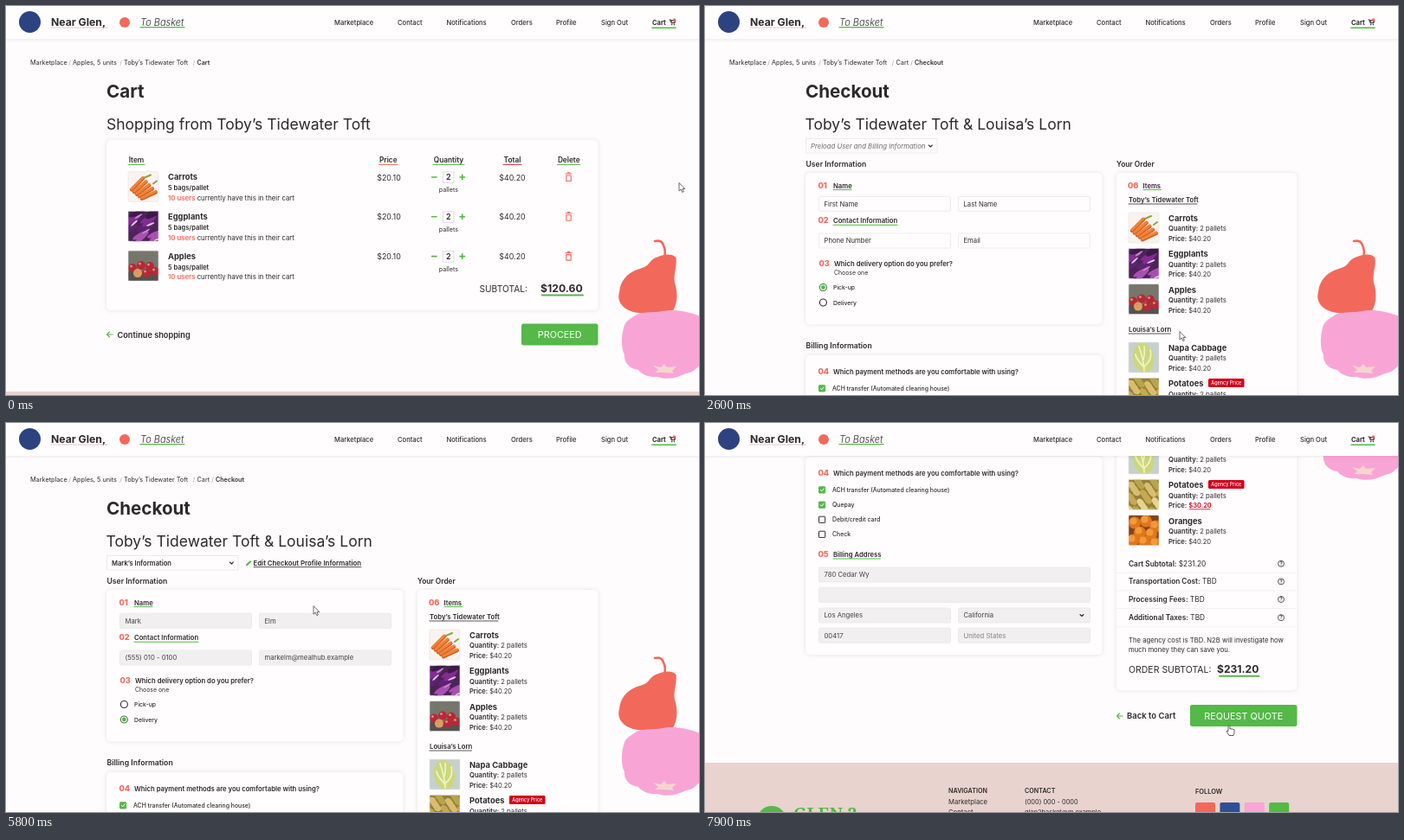
An HTML page for the animation above (8 s loop, 800x450 px).

```html
<!DOCTYPE html>
<html lang="en">
<head>
<meta charset="utf-8">
<title>Checkout walkthrough</title>
<style>
  html, body { margin: 0; width: 100%; height: 100%; overflow: hidden; background: #fefcfd; }
  svg { display: block; }
  #stage { width: 100vw; height: 100vh; }
  text { font-family: Inter, "Open Sans", sans-serif; font-optical-sizing: none; fill: #2d2a2b; white-space: pre; }
  .mid { text-anchor: middle; }
  .it { font-style: italic; }
  .serif { font-family: "Noto Serif", serif; }
  .card { fill: #fffdfe; filter: drop-shadow(0 0 2.5px #0000001c); }
  .line { fill: none; stroke-linecap: round; stroke-linejoin: round; }
</style>
</head>
<body>
<svg id="stage" viewBox="0 0 800 450"></svg>
<script>
const GREEN = '#55b848', CORAL = '#f2695c', INK = '#2d2a2b', PINK = '#f8a5d6', RED = '#d0021b', GREY = '#6d696b';
const BORDER = '#e9e6e8';
const FARM_A = 'Toby’s Tidewater Toft', FARM_B = 'Louisa’s Lorn';
const LOOP = 8000, STEP = 100, CHECKOUT = 2000, OPEN = 3900, PICK = 5200;

const text = (x, y, s, size, weight = 400, attrs = '') =>
  `<text x="${x}" y="${y}" font-size="${size}" font-weight="${weight}" ${attrs}>${s}</text>`;
const rect = (x, y, w, h, fill, attrs = '') =>
  `<rect x="${x}" y="${y}" width="${w}" height="${h}" fill="${fill}" ${attrs}/>`;
const circle = (x, y, r, fill, attrs = '') => `<circle cx="${x}" cy="${y}" r="${r}" fill="${fill}" ${attrs}/>`;
const path = (d, color, width = 1) => `<path class="line" d="${d}" stroke="${color}" stroke-width="${width}"/>`;
const card = (x, y, w, h) => `<rect class="card" x="${x}" y="${y}" width="${w}" height="${h}" rx="5"/>`;
const group = (id, body) => `<g id="${id}">${body}</g>`;
const fill = c => `fill="${c}"`;
const bold = s => `<tspan font-weight="600">${s}</tspan>`;
const rule = (x1, x2, y, color = GREEN, width = 1) => path(`M${x1} ${y}H${x2}`, color, width);
const chevron = (x, y) => path(`M${x - 2} ${y - 1}l2 2 2-2`, INK, 1.1);
const back = (x, y) => path(`M${x + 7} ${y}h-6.5m3-3l-3 3 3 3`, GREEN, 1.1);
const button = (x, y, w, s) => rect(x, y, w, 25, GREEN, 'rx="2.5"') +
  text(x + w / 2, y + 16.7, s, 10.8, 400, 'class="mid" style="fill:#fff"');

// Small produce pictures built from repeated blobs on a 35 px tile
const blobs = (n, rx, ry, turn, colors, seed) => {
  let out = '';
  for (let i = 0; i < n; i++) {
    const x = (i * 13.7 + seed) % 36, y = (i * 9.3 + seed * 2) % 36;
    out += `<ellipse rx="${rx}" ry="${ry}" fill="${colors[i % colors.length]}" transform="translate(${x} ${y}) rotate(${turn + i * 11 % 25})"/>`;
  }
  return out;
};
const sticks = (color, width, dy) => [0, 1, 2, 3, 4].map(i =>
  path(`M${4 + i * 3} ${20 + dy + i * 2.6}L${17 + i * 3.7} ${7 + dy + i * 4}`, color, width)).join('');
const produce = {
  carrots: () => rect(0, 0, 35, 35, '#f8f3ee') + path('M19 7l7-3M29 14l4-3', '#87a64b', 2) +
    sticks('#cf5d24', 4.2, 1) + sticks('#f28236', 3, 0),
  eggplants: () => rect(0, 0, 35, 35, '#4d2358') + blobs(16, 10, 2.8, -45, ['#832c92', '#5e2274', '#a94fb3', '#3c1b47'], 4) +
    blobs(5, 5, 1, -42, ['#ded0df', '#c58acb'], 7),
  apples: () => rect(0, 0, 35, 35, '#777570') + rect(0, 24, 35, 11, '#56524e') +
    [[5, 20], [15, 17], [25, 18], [31, 24], [11, 26], [21, 26]].map(([x, y], i) =>
      circle(x, y, 5, i == 4 ? '#d9a05d' : '#b52936') + circle(x - 1.5, y - 2, 1.5, '#e28a70')).join('') +
    path('M7 10l4-4M20 11l3-5', '#68824a', 2),
  cabbage: () => rect(0, 0, 35, 35, '#c6d1cd') +
    '<ellipse cx="17" cy="18" rx="12" ry="17" fill="#cbd77c" transform="rotate(-12 17 18)"/>' +
    path('M18 33Q17 18 12 5M18 29Q9 20 8 14M18 28Q28 20 25 9M17 20Q19 12 18 5', '#eef1c4', 1.8),
  potatoes: () => rect(0, 0, 35, 35, '#93803c') + blobs(40, 4, 3.3, 15, ['#d9bd6d', '#c9a851', '#e6d38c', '#b5a54c'], 3),
  oranges: () => rect(0, 0, 35, 35, '#7e431d') +
    [[7, 9], [20, 7], [31, 13], [13, 20], [26, 22], [5, 29], [18, 31], [31, 33]].map(([x, y]) =>
      circle(x, y, 7, '#df771d') + circle(x - 1.5, y - 2, 4, '#f39a38')).join('')
};
const thumb = (x, y, kind) => `<svg x="${x}" y="${y}" width="35" height="35">${produce[kind]()}</svg>` +
  rect(x, y, 35, 35, 'none', 'rx="2" stroke="#e7e2e3" stroke-width=".6"');

const crumbs = list => list.map(([x, s], i) => {
  const last = i == list.length - 1;
  return text(x, 68.4, s, last ? 7.1 : 7.3, last ? 600 : 400) +
    (last ? '' : text(list[i + 1][0] - 4.8, 68.4, '/', 7.25, 400, 'style="fill:#aaa"'));
}).join('');
const TRAIL = [[28, 'Marketplace'], [77, 'Apples, 5 units'], [136, FARM_A], [220.5, 'Cart']];

function cartRow([name, kind], i) {
  const y = 198 + i * 45.8;
  return thumb(141, y - 6.5, kind) + text(187, y + 3.4, name, 9.35, 700) +
    text(187, y + 15.4, '5 bags/pallet', 7.5, 600) +
    text(187, y + 26.7, `<tspan font-weight="600" style="fill:${CORAL}">10 users</tspan> currently have this in their cart`, 7.8) +
    text(442, y + 3.5, '$20.10', 8.9, 400, 'class="mid"') + text(584.5, y + 3.5, '$40.20', 8.9, 400, 'class="mid"') +
    path(`M491.5 ${y}h5.5M524 ${y}h5.5m-2.75-2.75v5.5`, GREEN, 1.6) +
    rect(504.5, y - 6, 12.5, 12.5, '#fff', 'stroke="#d8d4d6" stroke-width=".8"') +
    text(510.8, y + 3.4, '2', 9, 600, 'class="mid"') + text(511, y + 17.3, 'pallets', 7.2, 400, 'class="mid"') +
    path(`M646 ${y - 4}h7m-4.7-1.2h2.4M646.8 ${y - 2}v6.5h5.4v-6.5z`, CORAL, 1.1);
}

function cartPage() {
  const heads = [['Item', 141, 160, GREEN], ['Price', 430.5, 452, CORAL], ['Quantity', 493, 529, GREEN],
    ['Total', 574, 595, '#a8433d'], ['Delete', 636.5, 663, GREEN]];
  return crumbs(TRAIL) + text(116, 106.3, 'Cart', 20.6, 700) + text(116, 143, 'Shopping from ' + FARM_A, 17.5) +
    card(116, 155, 567.5, 197) +
    heads.map(([s, a, b, c]) => text((a + b) / 2, 181, s, 8.3, 600, 'class="mid"') + rule(a, b, 183.6, c)).join('') +
    [['Carrots', 'carrots'], ['Eggplants', 'eggplants'], ['Apples', 'apples']].map(cartRow).join('') +
    text(546.5, 331, 'SUBTOTAL:', 10.2) + text(617, 331, '$120.60', 12.2, 700) + rule(618.5, 666, 334.4, GREEN, 2) +
    back(116, 380) + text(128.5, 383.5, 'Continue shopping', 9.2, 600) + button(595, 367.5, 88.5, 'PROCEED') +
    rect(0, 446, 800, 4, '#e8d3ce');
}

const step = (x, y, n, s, size = 7.7) => text(x - 17.5, y, n, 9.2, 800, `style="fill:${CORAL}"`) + text(x, y, s, size, 600);
const field = (x, y, w, s, on, color = on ? '#454142' : INK) =>
  rect(x, y, w, 17, on ? '#f1eff0' : '#fffdfe', `rx="1.5" stroke="${BORDER}" stroke-width=".8"`) +
  text(x + 6, y + 11.4, s, 7.7, 400, `style="fill:${color}"`);
const radio = (y, s, on) => circle(136.4, y, 4, '#fff', `stroke="${on ? '#397d35' : INK}" stroke-width="1.1"`) +
  (on ? circle(136.4, y, 2.4, GREEN) : '') + text(148, y + 2.5, s, 6.85, 500);
const check = (y, s, on) => rect(131.5, y - 3.6, 7.2, 7.2, on ? GREEN : '#fff', `rx=".6" stroke="${on ? GREEN : INK}" stroke-width="1"`) +
  (on ? path(`M133.2 ${y}l1.4 1.5 2.6-3`, '#fff', 1) : '') + text(147, y + 2.5, s, 6.87, 500);

function orderItem([y, name, kind]) {
  const deal = kind == 'potatoes';
  return thumb(489, y, kind) + text(535, y + 10, name, 9.35, 700) +
    text(535, y + 21.4, bold('Quantity:') + ' 2 pallets', 7.65) +
    text(535, y + 33, bold('Price:') + (deal ? ` <tspan font-weight="600" style="fill:${RED}">$30.20</tspan>` : ' $40.20'), 7.55) +
    (deal ? rule(559, 583, y + 34.4, RED, .8) + rect(581, y + .7, 41.5, 10, RED, 'rx="1.5"') +
      text(601.8, y + 7.7, 'Agency Price', 5.5, 500, 'class="mid" style="fill:#fff"') : '');
}

const costRow = ([y, label, value]) => text(489, y, `${bold(label)} ${value}`, 8.3) +
  circle(665, y - 3, 3.5, 'none', `stroke="${INK}" stroke-width=".8"`) + text(665, y - .9, '?', 5.8, 600, 'class="mid"') +
  rule(475, 683, y + 7.6, '#efeced', .8);

const preload = text(122, 164.6, 'Preload User and Billing Information', 7.75, 400, `class="it" style="fill:${GREY}"`);

function userFields(on) {
  const value = on ? ['Mark', 'Elm', '(555) 010 - 0100', 'markelm@mealhub.example'] : ['First Name', 'Last Name', 'Phone Number', 'Email'];
  return rect(116.5, 153.5, 151.5, 16.5, '#fffdfe', `stroke="${BORDER}" stroke-width=".8"`) + chevron(260.3, 162) +
    (on ? text(122, 164.6, 'Mark’s Information', 7.6, 600) + path('M278 164.2l4-4', GREEN, 2) +
        text(285.5, 164.6, 'Edit Checkout Profile Information', 7.8, 600) + rule(286, 410, 166.6, INK, .8)
      : preload) +
    value.map((s, i) => field(i % 2 ? 292.5 : 131.5, i < 2 ? 220.3 : 263, 152, s, on)).join('') +
    radio(325.5, 'Pick-up', !on) + radio(343, 'Delivery', on);
}

function footer() {
  return rect(0, 758, 800, 120, '#e8d3ce') + circle(77, 825, 17, GREEN) +
    text(102, 823.5, 'GLEN 2', 20, 800, `class="serif" style="fill:${GREEN}"`) +
    text(281, 793, 'NAVIGATION', 7.2, 600) + text(281, 805.5, 'Marketplace', 7.7) + text(281, 818, 'Contact', 7.7) +
    text(369, 793, 'CONTACT', 7.2, 600) + text(369, 805.5, '(000) 000 - 0000', 7.4) + text(369, 818, 'glen2basket@m.example', 7.4) +
    text(566, 794, 'FOLLOW', 7.4, 600) +
    [CORAL, '#2f4f94', PINK, GREEN].map((c, i) => rect(566 + i * 28.4, 804, 23, 23, c, 'rx="2"')).join('');
}

function checkoutPage() {
  const items = [[239, 'Carrots', 'carrots'], [280.4, 'Eggplants', 'eggplants'], [321.6, 'Apples', 'apples'],
    [389, 'Napa Cabbage', 'cabbage'], [430.3, 'Potatoes', 'potatoes'], [471.6, 'Oranges', 'oranges']];
  const costs = [[530.7, 'Cart Subtotal:', '$231.20'], [551.4, 'Transportation Cost:', 'TBD'],
    [572, 'Processing Fees:', 'TBD'], [593.2, 'Additional Taxes:', 'TBD']];
  return crumbs([...TRAIL, [242, 'Checkout']]) + text(116, 106.3, 'Checkout', 20.6, 700) +
    text(115.5, 143, `${FARM_A} &amp; ${FARM_B}`, 17.5) +
    text(116.5, 186, 'User Information', 8.6, 600) + card(116, 193, 342.5, 175.5) +
    step(148, 210.5, '01', 'Name') + rule(148, 169, 212.6) +
    step(148, 251.3, '02', 'Contact Information') + rule(148, 222, 253.3) +
    step(149, 301.4, '03', 'Which delivery option do you prefer?') + text(149, 310.8, 'Choose one', 6.9) +
    group('blank', userFields(false)) + group('filled', userFields(true)) +
    text(116.5, 396.2, 'Billing Information', 8.7, 600) + card(116, 404, 342.5, 229) +
    step(148, 426.3, '04', 'Which payment methods are you comfortable with using?') +
    check(442.4, 'ACH transfer (Automated clearing house)', true) + check(459.7, 'Quepay', true) +
    check(476.8, 'Debit/credit card') + check(493.8, 'Check') +
    step(148, 520.2, '05', 'Billing Address') + rule(148, 202.5, 522) +
    field(131.5, 532, 313, '780 Cedar Wy', true) + field(131.5, 555.4, 313, '', true) +
    field(131.5, 579, 152, 'Los Angeles', true) + field(292.5, 579, 152, 'California', true) + chevron(435, 587.5) +
    field(131.5, 602.2, 152, '00417', true) + field(292.5, 602.2, 152, 'United States', true, '#858183') +
    text(475, 186, 'Your Order', 8.4, 600) + card(475, 193, 208.5, 481.5) +
    step(505.5, 210.5, '06', 'Items') + rule(506, 526.5, 212.6) +
    text(489, 227.3, FARM_A, 7.75, 600) + rule(489, 568, 229, INK, .8) +
    text(489, 377.2, FARM_B, 7.75, 600) + rule(489, 537.5, 379, INK, .8) +
    items.map(orderItem).join('') + costs.map(costRow).join('') +
    text(489, 619.4, 'The agency cost is TBD. N2B will investigate how', 7.7) +
    text(489, 630, 'much money they can save you.', 7.7) +
    text(489, 654.2, 'ORDER SUBTOTAL:', 10.5) + text(591, 654.2, '$231.20', 12.1, 700) + rule(594, 639.5, 657.7, GREEN, 2) +
    back(475, 704) + text(487, 707.4, 'Back to Cart', 9.5, 600) + button(560, 691, 123.5, 'REQUEST QUOTE') + footer() +
    group('menu', '<rect class="card" x="116" y="153.5" width="152" height="79" rx="1"/>' + chevron(260.3, 162) + preload +
      ['Mark’s Information', 'Lucy Fen, 820 Moss Ln', 'Maddie Cooke'].map((s, i) => text(122, 182.7 + i * 18.3, s, 7.6, 600)).join(''));
}

const fruit = path('M749 272Q757 270 759 277Q762 283 760 291', CORAL, 2.6) +
  `<path ${fill(CORAL)} d="M753 290C760 287 769 286 773.5 291C775 301 770 310 772 320C776 333 775 346 769 354C756 358 738 357 724 354C711 350 705 341 708 331C709 318 717 310 726 306C733 303 738 303 742 298C746 293 749 291 753 290Z"/>
  <path ${fill(PINK)} d="M713 372C715 364 722 361 728 357C738 353 750 355 758 353C772 350 790 354 804 360V414C797 417 795 424 785 425C775 430 764 433 752 429C742 430 734 426 730 421C720 420 713 412 714 404C710 396 710 384 713 372Z"/>
  <path ${fill('#f4d5cf')} d="M747 416L756 418L760 414L763 418L774 417L769 422L771 425L759 424L749 424L753 421Z"/>`;

const header = '<rect class="card" x="-5" y="-10" width="810" height="48"/>' + circle(27.5, 18.5, 12.5, '#2d4380') +
  text(52, 23, 'Near Glen,', 12.2, 700) + rule(52, 117, 25, '#e7b5ac', .8) + circle(137, 19, 6, CORAL) +
  text(155, 23, 'To Basket', 11, 300, 'class="it"') + rule(155, 206, 24.6, GREEN, 1.2) +
  [[379, 'Marketplace'], [452, 'Contact'], [508.5, 'Notifications'], [583, 'Orders'], [635, 'Profile'], [687, 'Sign Out']]
    .map(([x, s]) => text(x, 21.7, s, 7.6, 500)).join('') +
  text(746, 21.7, 'Cart', 7.5, 700) + path('M766 16h1.2l1 3.5h3.6l.8-2.6h-4.8', INK, 1.2) +
  circle(768.7, 21.4, .8, INK) + circle(771.4, 21.4, .8, INK) + circle(771.5, 16, 1.8, CORAL) + rule(746, 773, 25.2, GREEN, 1.6);

const arrow = '<path fill="#fff" stroke="#444" stroke-width=".8" stroke-linejoin="round" d="M0 0V9.5L2.2 7.5L3.8 11L5.4 10.2L3.9 7H6.8Z"/>';
const hand = '<path fill="#fff" stroke="#333" stroke-width=".8" stroke-linejoin="round" d="M-1 1Q0-.8 1 1V4.5Q2 3.6 2.9 4.7Q4 4 4.6 5.1Q6 4.7 6 6V8.5Q6 10 5 12H0L-2.8 7.4Q-2.6 6 -1 7Z"/>';

const stage = document.getElementById('stage');
stage.innerHTML = group('page', group('cart', cartPage()) + group('checkout', checkoutPage()) + fruit) +
  header + group('cursor', group('arrow', arrow) + group('hand', hand));

const POINTER = [[0, 777, 204.5], [200, 777, 204.5], [1000, 621, 380.5], [2000, 621, 380.5], [2600, 548, 376.5], [2800, 548, 376.5],
  [3700, 215, 163], [4000, 215, 163], [4600, 161, 180], [5300, 161, 180], [6000, 403, 219.5], [7200, 403, 219.5], [7700, 605, 349.5]];
const SCROLL = [[6290, 0], [6400, 50.5], [6900, 277], [7100, 365]];
const HAND = [[900, CHECKOUT], [3600, 5500], [7600, LOOP]];

const ease = p => p * p * (3 - 2 * p), linear = p => p;
function at(keys, t, col, curve) {
  const i = keys.findIndex(k => k[0] > t);
  if (i < 0) return keys[keys.length - 1][col];
  if (i == 0) return keys[0][col];
  const a = keys[i - 1], b = keys[i];
  return a[col] + (b[col] - a[col]) * curve((t - a[0]) / (b[0] - a[0]));
}
const el = id => document.getElementById(id);
const show = (id, on) => { el(id).style.display = on ? '' : 'none'; };
const move = (id, x, y) => el(id).setAttribute('transform', `translate(${x} ${y})`);

function draw(t) {
  show('cart', t < CHECKOUT);
  show('checkout', t >= CHECKOUT);
  show('blank', t < PICK);
  show('filled', t >= PICK);
  show('menu', t >= OPEN && t < PICK);
  move('page', 0, -at(SCROLL, t, 1, linear));
  move('cursor', at(POINTER, t, 1, ease), at(POINTER, t, 2, ease));
  const pointing = HAND.some(([a, b]) => t >= a && t < b);
  show('hand', pointing);
  show('arrow', !pointing);
}

const start = performance.now();
function tick() {
  const t = (performance.now() - start) % LOOP;
  draw(Math.floor(t / STEP) * STEP);
  requestAnimationFrame(tick);
}
tick();
</script>
</body>
</html>
```
